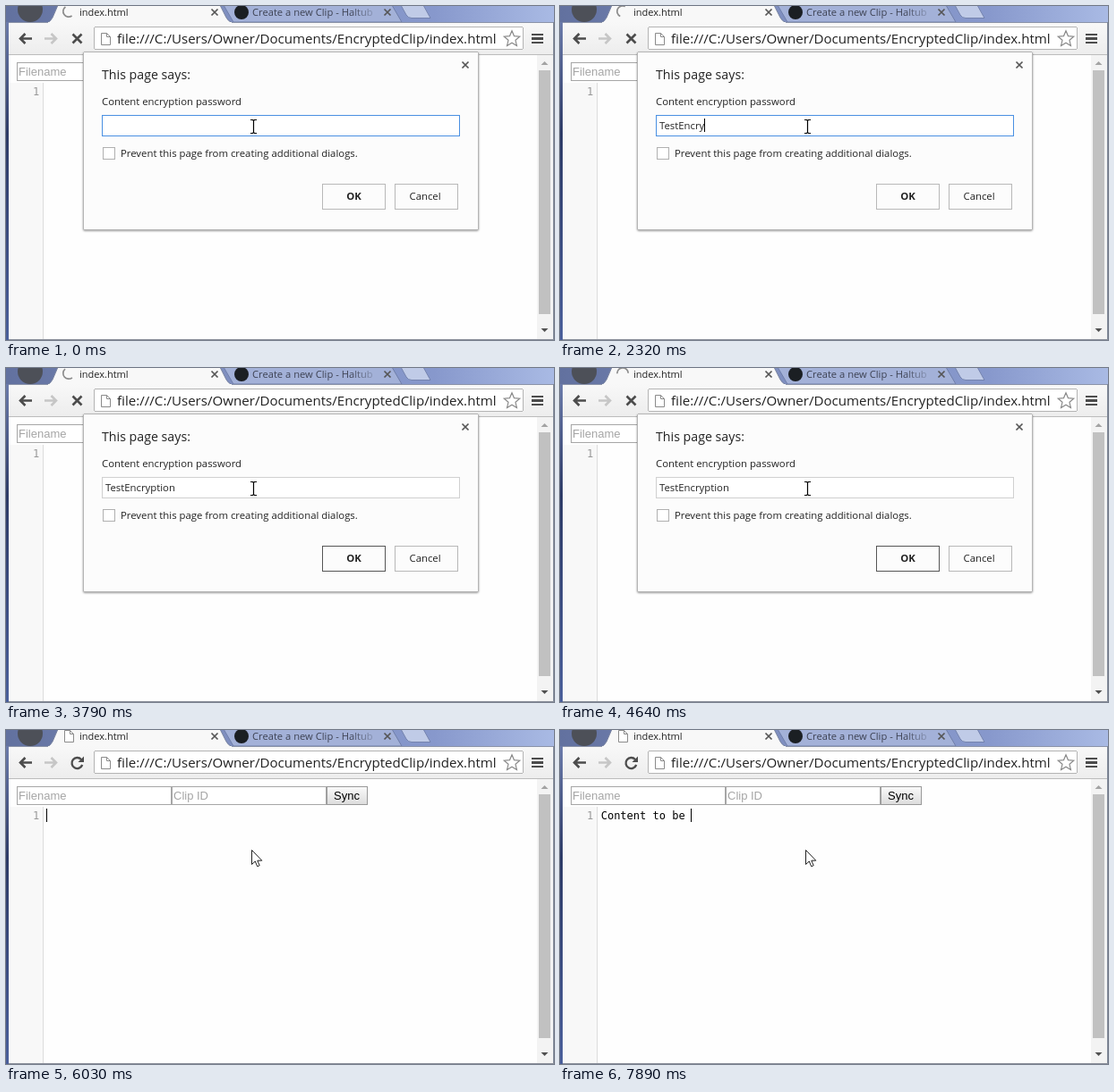
An HTML page for the animation above (8 s loop, 612 by 374 pixels).

```html
<!DOCTYPE html>
<html lang="en">
<head>
<meta charset="utf-8">
<title>Encrypted editor</title>
<style>
html, body { margin: 0; width: 100%; height: 100%; overflow: hidden; background: #fff; }
svg { display: block; width: 612px; height: 374px; }
text { white-space: pre; }
.ui { font-family: "Open Sans", "Noto Sans", sans-serif; font-size: 11.35px; fill: #222; }
.field { font-family: "Liberation Sans", Arial, sans-serif; font-size: 13px; fill: #a5a5a5; }
.code { font-family: "DejaVu Sans Mono", monospace; font-size: 12px; fill: #000; }
.line { fill: none; stroke-width: 1; }
rect, .crisp { shape-rendering: crispEdges; }
</style>
</head>
<body>
<svg viewBox="0 0 612 374">
  <defs>
    <linearGradient id="sky">
      <stop offset="0" stop-color="#62719f"/>
      <stop offset=".4" stop-color="#7f8fc0"/>
      <stop offset=".78" stop-color="#8798cc"/>
      <stop offset="1" stop-color="#a9bae4"/>
    </linearGradient>
    <linearGradient id="edge" x2="0" y2="1">
      <stop offset="0" stop-color="#6b7bab"/>
      <stop offset=".35" stop-color="#2c3a66"/>
      <stop offset="1" stop-color="#4a5f9b"/>
    </linearGradient>
    <linearGradient id="bar" x2="0" y2="1">
      <stop offset="0" stop-color="#f8f8f8"/>
      <stop offset="1" stop-color="#ededed"/>
    </linearGradient>
    <linearGradient id="button" x2="0" y2="1">
      <stop offset="0" stop-color="#fafafa"/>
      <stop offset="1" stop-color="#dcdcdc"/>
    </linearGradient>
    <linearGradient id="fade" gradientUnits="userSpaceOnUse" x1="385" x2="415">
      <stop offset="0" stop-color="#3c4152"/>
      <stop offset="1" stop-color="#3c4152" stop-opacity=".1"/>
    </linearGradient>
    <filter id="shadow" x="-5%" y="-5%" width="110%" height="115%">
      <feDropShadow dx="0" dy="1" stdDeviation="1.2" flood-opacity=".4"/>
    </filter>
    <path id="cross" d="M-3.5-3.5 3.5 3.5M3.5-3.5-3.5 3.5" fill="none" stroke="#555" stroke-width="1.7"/>
    <g id="sheet" fill="#fff" stroke="#8b8b8b">
      <path d="M.5.5h6l4 4v9h-10z"/>
      <path d="M6.5.5v4h4" fill="none"/>
    </g>
  </defs>

  <!-- window and tabs -->
  <rect width="612" height="20" fill="url(#sky)"/>
  <rect y="18" width="3" height="356" fill="url(#edge)"/>
  <circle cx="27" cy="4" r="14" fill="#4d5058"/>
  <path d="M243-1H431L442 18H254Z" fill="#a3b1d8" stroke="#6f7ea9"/>
  <path d="M441-1H466L474 13.500H453Q449 13.500 447 10Z" fill="#c0cbe7" stroke="#7483ae"/>
  <path d="M46 19Q50 17 52 13L58-1H239L246 13Q248 17 253 19Z" fill="#f8f8f8" stroke="#77829f"/>
  <use href="#cross" x="233" y="7"/>
  <use href="#cross" x="426" y="7"/>
  <circle cx="263" cy="7" r="8" fill="#1b1f23"/>
  <text class="ui" x="82" y="11" style="font-size:11px">index.html</text>
  <text class="ui" x="275" y="11" style="font-size:11.200px;fill:url(#fade)">Create a new Clip - Haltub</text>

  <!-- toolbar -->
  <rect x="3" y="18" width="608" height="36" fill="url(#bar)"/>
  <rect x="3" y="18" width="44" height="1" fill="#8b93a8"/>
  <rect x="252" y="18" width="359" height="1" fill="#8b93a8"/>
  <rect x="3" y="54" width="608" height="1" fill="#bcbcbc"/>
  <g fill="none" stroke-width="2.600">
    <path id="back" d="M29 36.500H16M21.500 31 16 36.500 21.500 42" stroke="#4c4c4c"/>
    <path d="M43 36.500H56M50.500 31 56 36.500 50.500 42" stroke="#c6c6c6"/>
    <path id="stop" d="M74.500 31.500 84.500 41.500M84.500 31.500 74.500 41.500" stroke="#4c4c4c"/>
    <g id="reload">
      <path d="M84 33A6 6 0 1 0 85.200 39" stroke="#4c4c4c" stroke-width="2.300"/>
      <path d="M87 29.500V36H80.500Z" fill="#4c4c4c"/>
    </g>
    <path class="crisp" d="M587 32H600M587 36.500H600M587 41H600" stroke="#4c4c4c"/>
  </g>
  <rect class="line" x="98.500" y="23.500" width="479" height="25" rx="2" style="fill:#fff" stroke="#b4b4b4"/>
  <use href="#sheet" x="106" y="30"/>
  <text class="ui" x="124" y="42" style="font-size:15.100px">file:///C:/Users/Owner/Documents/EncryptedClip/index.html</text>
  <path id="star" fill="#fff" stroke="#8a8a8a" stroke-width="1.200"/>

  <!-- page -->
  <rect x="3" y="55" width="608" height="318" fill="#fefefe"/>
  <rect x="3" y="86" width="38" height="287" fill="#f8f8f8"/>
  <rect x="41" y="86" width="1" height="287" fill="#dcdcdc"/>
  <text class="code" x="30" y="100" style="fill:#999">1</text>
  <rect class="line" x="12.500" y="63.500" width="172" height="20" style="fill:#fff" stroke="#a6a6a6"/>
  <rect class="line" x="185.500" y="63.500" width="172" height="20" style="fill:#fff" stroke="#a6a6a6"/>
  <rect class="line" x="358.500" y="63.500" width="45" height="20" style="fill:url(#button)" stroke="#999"/>
  <text class="field" x="14" y="78">Filename</text>
  <text class="field" x="187" y="78">Clip ID</text>
  <text class="field" x="366" y="78" style="fill:#000">Sync</text>
  <text class="code" id="content" x="45.700" y="100"></text>
  <rect id="codeCaret" y="88" width="1" height="15"/>
  <rect x="593" y="55" width="18" height="318" fill="#f3f3f3"/>
  <rect x="595" y="72" width="13" height="273" fill="#c1c1c1"/>
  <path d="M597.500 66H605.500L601.500 62Z" fill="#a3a3a3"/>
  <path d="M597.500 361H605.500L601.500 365Z" fill="#505050"/>
  <rect x="611" y="18" width="1" height="356" fill="#7e8798"/>
  <rect x="3" y="373" width="609" height="1" fill="#8c919c"/>

  <!-- tab icon -->
  <path id="spinner" d="M0-6.200A6.200 6.200 0 0 1 0 6.200" fill="none" stroke="#8c8c8c" stroke-width="1.700"/>
  <use id="tabIcon" href="#sheet" x="65" y="0"/>

  <!-- prompt -->
  <g id="dialog">
    <rect x="86.500" y="51.500" width="441" height="199" rx="2" fill="#fcfcfc" stroke="#b5b5b5" filter="url(#shadow)"/>
    <use href="#cross" x="513" y="66"/>
    <text class="ui" x="107" y="82" style="font-size:14.200px">This page says:</text>
    <text class="ui" x="107" y="111">Content encryption password</text>
    <rect class="line" id="input" x="107.500" y="122.500" width="399" height="23" style="fill:#fff"/>
    <text class="ui" id="password" x="111" y="138"></text>
    <rect id="inputCaret" y="126" width="1" height="15"/>
    <rect class="line" id="check" x="108.500" y="158.500" width="13" height="13" rx="1" style="fill:#fff"/>
    <text class="ui" x="128" y="169">Prevent this page from creating additional dialogs.</text>
    <rect class="line" id="ok" x="353.500" y="199.500" width="70" height="28" rx="1" style="fill:#fcfcfc"/>
    <rect class="line" x="434.500" y="199.500" width="70" height="28" rx="1" stroke="#b8b8b8"/>
    <text class="ui" x="388.500" y="217" text-anchor="middle" font-weight="700">OK</text>
    <text class="ui" x="468" y="217" text-anchor="middle">Cancel</text>
    <path d="M273 127.500H275.500L276.500 128.500 277.500 127.500H280M276.500 128V142M273 142.500H275.500L276.500 141.500 277.500 142.500H280" fill="none" stroke="#000" stroke-width="1.200"/>
  </g>
  <path id="arrow" d="M274.500 134.500V150.500L278.300 147 280.700 152.800 283.200 151.700 280.800 146.200H285.800Z" fill="#fff" stroke="#222"/>
</svg>
<script>
const LOOP = 8000, CLOSE = 4760, TICK = 135;
const PASSWORD = "TestEncryption", CONTENT = "Content to be ";

// [time, value] steps: letters typed, caret shown, focused control
const passwordKeys = [[0, 0], [920, 1], [1350, 3], [1480, 4], [1780, 5], [2050, 6], [2170, 7],
  [2320, 9], [2450, 10], [2600, 11], [2720, 12], [2880, 14]];
const contentKeys = [[0, 0], [6160, 1], [6280, 2], [6430, 3], [6560, 4], [6690, 6], [6820, 7],
  [7190, 8], [7490, 9], [7610, 11], [7740, 12], [7890, 14]];
const inputBlink = [[0, 0], [300, 1], [780, 0], [920, 1], [3290, 0]];
const codeBlink = [[0, 0], [4890, 1], [5400, 0], [6030, 1]];
const focusSteps = [[0, "input"], [3290, "check"], [3670, "ok"]];
const borders = { input: ["#d0d0d0", "#4a90e2"], check: ["#b0b0b0", "#555"], ok: ["#b8b8b8", "#555"] };

const el = id => document.getElementById(id);
const at = (steps, t) => steps.filter(([time]) => time <= t).pop()[1];
const show = (id, on) => { el(id).style.display = on ? "" : "none"; };

const points = Array.from({ length: 10 }, (_, i) => {
  const a = i * Math.PI / 5, r = i % 2 ? 4.2 : 9.2;
  return `${565 + r * Math.sin(a)} ${37 - r * Math.cos(a)}`;
});
el("star").setAttribute("d", `M${points.join("L")}Z`);

function type(id, caret, text, count, x) {
  el(id).textContent = text.slice(0, count);
  const width = count ? el(id).getComputedTextLength() : 0;
  el(caret).setAttribute("x", Math.floor(x + width));
}

function draw(t) {
  const open = t < CLOSE;
  for (const id of ["dialog", "spinner", "stop"]) show(id, open);
  for (const id of ["tabIcon", "reload", "arrow"]) show(id, !open);

  const tick = Math.floor(t / TICK) * TICK;
  el("spinner").setAttribute("transform", `translate(70 6) rotate(${-360 * (tick - 3015) / 1255})`);

  const focus = at(focusSteps, t);
  for (const id in borders) el(id).setAttribute("stroke", borders[id][+(id === focus)]);

  if (open) type("password", "inputCaret", PASSWORD, at(passwordKeys, t), 111);
  type("content", "codeCaret", CONTENT, at(contentKeys, t), 45.7);
  show("inputCaret", at(inputBlink, t));
  show("codeCaret", at(codeBlink, t));
}

const start = performance.now();
function frame() {
  draw((performance.now() - start) % LOOP);
  requestAnimationFrame(frame);
}
frame();
</script>
</body>
</html>
```
